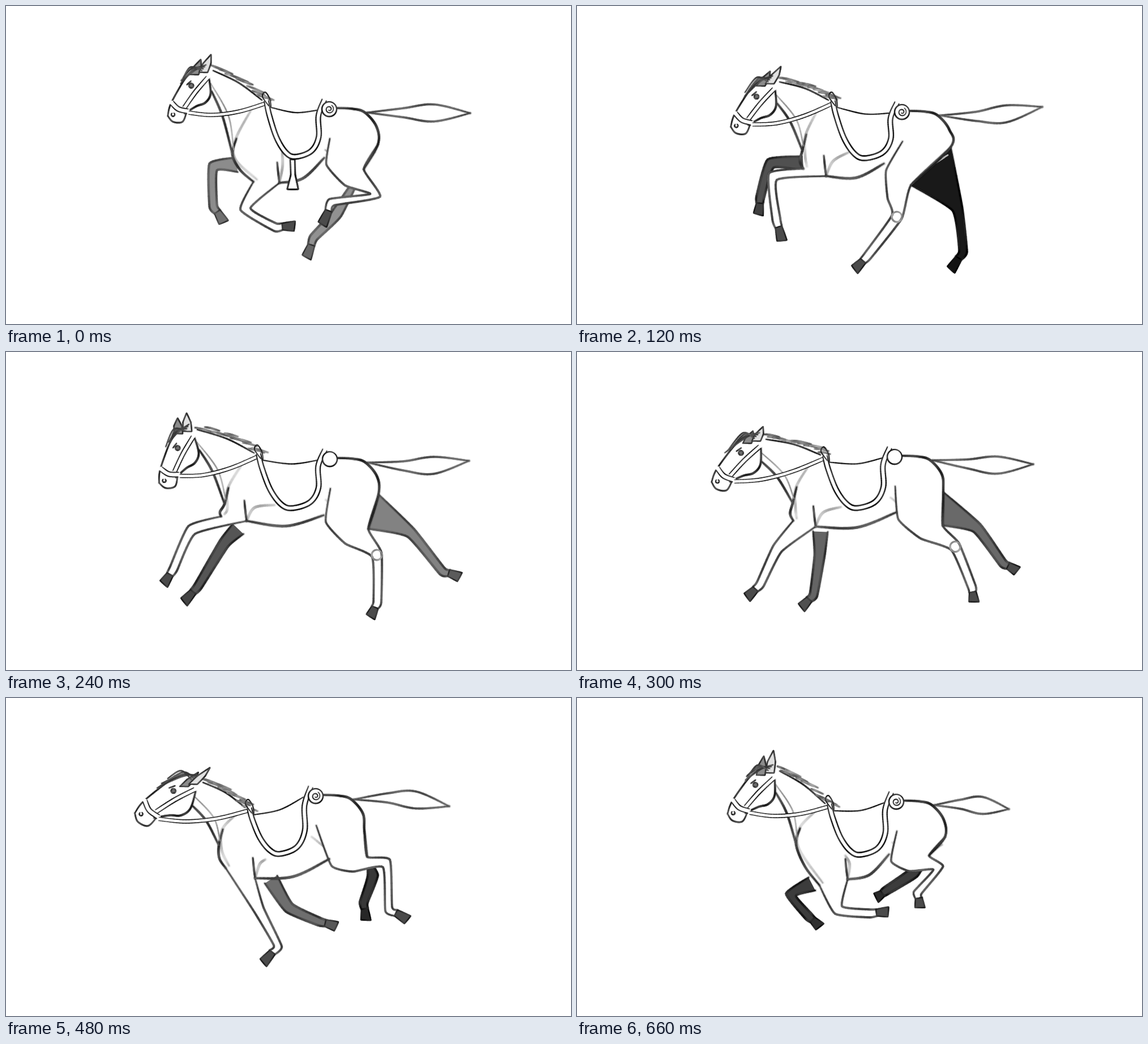
Animation, 998 px wide and 561 px high, one loop 720 ms. Source, as an HTML page with a canvas:

```html
<!DOCTYPE html>
<html lang="en">
<head>
<meta charset="utf-8">
<title>Galloping horse sketch</title>
<style>
html, body { margin: 0; width: 100%; height: 100%; overflow: hidden; background: #fff; }
canvas { display: block; width: 998px; height: 561px; }
</style>
</head>
<body>
<canvas id="stage" width="998" height="561"></canvas>
<script>
const ctx = document.getElementById('stage').getContext('2d');
const STEP = 60;

// Joints of each key pose; everything else is built around them.
// head: poll, muzzle, ear tip
// trunk: withers, cantle, chest, forearm, elbow, stifle, gaskin, tail tip
// legs: (top of far foreleg,) knee or hock, fetlock, toe
const KEYS = [
  {
    at: 0, marks: 'rein curl stirrup', hindTone: 145, foreTone: 140,
    head: [[358, 115], [298, 200], [362, 86]],
    trunk: [[460, 168], [562, 166], [400, 262], [437, 310], [483, 312], [566, 280], [632, 288], [820, 189]],
    nearHind: [[652, 334], [576, 346], [560, 384]], farHind: [[585, 365], [544, 408], [532, 442]],
    nearFore: [[423, 358], [475, 390], [508, 388]], farFore: [[408, 280], [366, 284], [366, 352], [384, 380]]
  }, {
    at: 2, marks: 'rein curl hock', hindTone: 25, foreTone: 80,
    head: [[350, 135], [284, 220], [360, 107]],
    trunk: [[452, 168], [565, 171], [398, 255], [400, 287], [440, 300], [546, 290], [590, 316], [822, 178]],
    nearHind: [[565, 372], [514, 440], [492, 464]], farHind: [[672, 358], [682, 432], [662, 464]],
    nearFore: [[346, 301], [352, 375], [362, 412]], farFore: [[400, 278], [342, 278], [324, 336], [321, 366]]
  }, {
    at: 4, marks: 'rein hock', hindTone: 130, foreTone: 85,
    head: [[330, 138], [284, 235], [319, 108]],
    trunk: [[446, 180], [563, 173], [386, 268], [380, 290], [425, 298], [565, 300], [640, 312], [818, 192]],
    nearHind: [[655, 358], [656, 440], [645, 466]], farHind: [[715, 319], [770, 386], [800, 396]],
    nearFore: [[328, 314], [296, 382], [280, 408]], farFore: [[410, 312], [385, 338], [340, 412], [316, 440]]
  }, {
    at: 6, marks: 'rein hock', hindTone: 80, foreTone: 115,
    head: [[322, 172], [216, 240], [338, 156]],
    trunk: [[430, 187], [541, 165], [376, 265], [384, 305], [418, 318], [570, 290], [652, 300], [794, 204]],
    nearHind: [[681, 329], [738, 386], [758, 412]], farHind: [[698, 302], [734, 358], [752, 374]],
    nearFore: [[380, 380], [352, 436], [324, 456]], farFore: [[450, 322], [472, 380], [496, 443], [480, 460]]
  }, {
    at: 8, marks: 'rein curl', hindTone: 55, foreTone: 110,
    head: [[340, 150], [238, 215], [360, 123]],
    trunk: [[430, 195], [538, 157], [376, 260], [388, 300], [440, 318], [575, 296], [638, 280], [783, 191]],
    nearHind: [[672, 292], [676, 372], [708, 390]], farHind: [[648, 312], [632, 360], [636, 390]],
    nearFore: [[447, 374], [480, 437], [456, 466]], farFore: [[468, 320], [500, 370], [552, 394], [582, 402]]
  }, {
    at: 9, marks: 'hock', hindTone: 35, foreTone: 35,
    head: [[342, 145], [252, 220], [357, 108]],
    trunk: [[436, 200], [550, 160], [375, 272], [404, 330], [470, 330], [560, 290], [630, 281], [760, 211]],
    nearHind: [[656, 298], [652, 368], [678, 390]], farHind: [[602, 316], [598, 370], [600, 396]],
    nearFore: [[505, 390], [542, 446], [520, 466]], farFore: [[436, 345], [455, 385], [530, 385], [564, 381]]
  }, {
    at: 11, marks: 'rein curl', hindTone: 60, foreTone: 60,
    head: [[350, 130], [278, 212], [347, 93]],
    trunk: [[446, 188], [555, 167], [387, 258], [428, 330], [478, 320], [555, 288], [622, 278], [763, 196]],
    nearHind: [[638, 300], [602, 343], [606, 368]], farHind: [[595, 308], [546, 340], [530, 352]],
    nearFore: [[462, 374], [516, 380], [548, 377]], farFore: [[415, 328], [378, 347], [408, 384], [428, 402]]
  }
];

const mix = (a, b, t) => a + (b - a) * t;
const add = (p, x, y) => [p[0] + x, p[1] + y];
const go = (p, v, d) => [p[0] + v[0] * d, p[1] + v[1] * d];
const between = (a, b, t, x = 0, y = 0) => [mix(a[0], b[0], t) + x, mix(a[1], b[1], t) + y];
const aim = (a, b) => {
  const x = b[0] - a[0], y = b[1] - a[1], l = Math.hypot(x, y) || 1;
  return [x / l, y / l];
};
const turn = v => [-v[1], v[0]];
const grey = v => { v = Math.round(Math.max(0, Math.min(255, v))); return `rgb(${v},${v},${v})`; };

let seed = 1;
const rnd = () => (seed = seed * 16807 % 2147483647) / 2147483647;

// Blend any nested set of numbers; marks stay only where both poses have them
function blend(a, b, t) {
  if (typeof a === 'number') return mix(a, b, t);
  if (typeof a === 'string') return a.split(' ').filter(m => b.includes(m)).join(' ');
  if (Array.isArray(a)) return a.map((v, i) => blend(v, b[i], t));
  return Object.fromEntries(Object.keys(a).map(k => [k, blend(a[k], b[k], t)]));
}

// Spline through the points; a small bend keeps the corners
function curve(pts, bend = 1) {
  const out = [pts[0]], last = pts.length - 1;
  for (let i = 0; i < last; i++) {
    const p = pts[i], q = pts[i + 1], o = pts[Math.max(0, i - 1)], r = pts[Math.min(last, i + 2)];
    for (let j = 1; j <= 10; j++) {
      const t = j / 10, a = bend / 2 * t * (1 - t) ** 2, b = bend / 2 * t * t * (t - 1);
      const m = between(p, q, t * t * (3 - 2 * t));
      out.push([0, 1].map(k => m[k] + a * (q[k] - o[k]) + b * (r[k] - p[k])));
    }
  }
  return out;
}

function spiral(c, r, turns, end) {
  return Array.from({ length: 40 }, (_, i) => {
    const t = i / 39, a = t * turns * Math.PI * 2 - 1, s = mix(r, r * end, t);
    return add(c, s * Math.cos(a), s * Math.sin(a));
  });
}

function outline(path) {
  ctx.beginPath();
  path.forEach(p => ctx.lineTo(...p));
}

function fill(path, tone) {
  outline(path);
  ctx.fillStyle = grey(tone);
  ctx.fill();
}

// Charcoal line: a soft halo, then a tapered core of uneven tone
function brush(path, tone, width) {
  outline(path);
  ctx.strokeStyle = `rgba(0,0,0,${.22 * (1 - tone / 255)})`;
  ctx.lineWidth = width * 1.5;
  ctx.stroke();
  const n = path.length, phase = rnd() * 6;
  for (let i = 1; i < n; i++) {
    ctx.strokeStyle = grey(tone + 18 * Math.sin(i * .45 + phase));
    ctx.lineWidth = width * (.5 + .5 * Math.sqrt(Math.sin(Math.PI * i / n)));
    outline([path[i - 1], path[i]]);
    ctx.stroke();
  }
}

const line = (pts, tone, width, bend) => brush(curve(pts, bend), tone, width);

function shape(pts, tone, edge, width, bend = .2) {
  const path = curve([...pts, pts[0]], bend);
  fill(path, tone);
  brush(path, edge, width);
}

function band(pts, gap, tone, width) {
  const path = curve(pts), last = path.length - 1;
  outline(path);
  ctx.strokeStyle = '#fff';
  ctx.lineWidth = gap;
  ctx.stroke();
  for (const side of [-1, 1]) {
    brush(path.map((p, i) => go(p, turn(aim(path[Math.max(0, i - 1)], path[Math.min(last, i + 1)])), side * gap / 2)), tone, width);
  }
}

// Two sides run from the body past knee and fetlock to a filled hoof
function leg(front, back, [knee, fetlock, toe], tone, edge, hoofTone) {
  const topF = front[front.length - 1], topB = back[back.length - 1];
  const top = between(topF, topB, .5), down = aim(fetlock, toe), hoof = between(fetlock, toe, .4);
  const across = (a, b, c) => turn(aim([0, 0], go(aim(a, b), aim(b, c), 1)));
  const nk = across(top, knee, fetlock), nf = across(knee, fetlock, toe), nh = turn(down);
  const facing = (topF[0] - topB[0]) * nk[0] + (topF[1] - topB[1]) * nk[1] > 0 ? 1 : -1;
  const side = (start, s) => curve([...start, go(knee, nk, 9 * s), go(fetlock, nf, 7 * s), go(hoof, nh, 6 * s)], .5);
  const a = side(front, facing), b = side(back, -facing);
  fill([...a, ...b.slice().reverse()], tone);
  brush(a, edge, 3.6);
  brush(b, edge, 3.6);
  shape([go(hoof, nh, 6), go(toe, nh, 9), go(go(toe, down, 3), nh, -8), go(hoof, nh, -6)], hoofTone, hoofTone * .6, 2.2);
}

function drawHead([poll, muzzle, ear], withers, chest, marks) {
  const u = aim(poll, muzzle), v = turn(u), size = Math.hypot(muzzle[0] - poll[0], muzzle[1] - poll[1]);
  const at = (x, y) => go(go(poll, u, x * size), v, y * size);

  // neck and mane
  line([at(.25, -.24), between(at(.25, -.24), chest, .45, 3, -5), chest], 65, 4);
  line([at(.15, -.15), between(at(.15, -.15), chest, .5, 12, -6), add(chest, 2, -8)], 165, 2.5);
  const crest = curve([add(poll, 8, -1), between(poll, withers, .5, 2, -6), add(withers, -8, -2)]);
  brush(crest, 50, 2.8);
  crest.forEach((p, i) => {
    if (i % 2) return;
    const root = add(p, -4, -3 - rnd() * 7), slope = aim(poll, withers), l = 16 + rnd() * 14;
    line([root, go(add(root, 0, -2), slope, l * .5), go(add(root, 5, -1), slope, l)], 105 + rnd() * 50, 3.5);
  });

  // ears: the far one is smaller and behind
  for (const [x, y, k] of [[-16, 4, .85], [0, 0, 1]]) {
    const base = add(poll, x - 10, y + 2), tip = between(base, add(ear, x, y), k);
    shape([add(base, -7, 0), between(base, tip, .5, -7), tip, between(base, tip, .5, 7), add(base, 8, 0)], k < 1 ? 140 : 225, 60, 2.4);
  }

  // face
  line([at(.08, .2), at(.3, .25), at(.55, .24), at(.85, .2), at(1.02, .13)], 50, 2.8);
  line([at(1.02, .13), at(1.05, 0), at(.96, -.13), at(.8, -.1)], 65, 2.8);
  line([at(.82, -.08), at(.61, -.17), at(.47, -.26), at(.3, -.25), at(.1, -.08)], 45, 3.6);
  for (let i = 0; i < 4; i++) line([at(-.06 + i * .04, .1), at(.12, .2 + i * .03), at(.3 + rnd() * .25, .25 + rnd() * .05)], 75, 2.6);
  const eye = spiral(at(.37, .1), 4, 1, 1);
  fill(eye, 110);
  brush(eye, 70, 2.4);
  brush(spiral(at(.95, .07), 3, .8, 1), 55, 2.2);
  line([at(.31, .15), at(.4, .17)], 60, 2.4);

  // bridle
  band([at(.1, -.05), at(.42, -.02), at(.74, -.02)], 7, 45, 1.8);
  band([at(.8, .2), at(.82, .05), at(.76, -.1)], 8, 50, 1.8);
  if (marks.includes('rein')) {
    const bit = at(.77, -.13);
    band([bit, between(bit, withers, .3, 0, 10), between(bit, withers, .65, 0, 11), add(withers, 4, 2)], 6, 40, 1.5);
  }
}

function drawSaddle(withers, cantle, marks) {
  const low = between(withers, cantle, .5, 0, 99), roll = add(cantle, 9, 16);
  const bow = (a, x, y) => [mix(a[0], low[0], x), mix(a[1], low[1], y)];
  line([add(withers, 8, 11), between(withers, cantle, .5, 0, 21), add(cantle, -13, 18)], 35, 2.2);
  if (marks.includes('stirrup')) {
    const s = add(low, -9, 5);
    shape([s, add(s, 1, 27), add(s, -5, 52), add(s, 14, 52), add(s, 9, 27), add(s, 8, 0)], 255, 40, 2.8);
  }
  band([withers, bow(withers, .1, .25), bow(withers, .35, .65), bow(withers, .67, .92), low,
    bow(cantle, .45, .9), bow(cantle, .19, .65), bow(cantle, .2, .28), cantle], 8, 35, 2.3);
  line([add(withers, 4, 8), add(withers, -7, -8), add(withers, -2, -16), add(withers, 6, -4), add(withers, 8, 10)], 45, 2);
  fill(spiral(roll, 13, 1, 1), 255);
  brush(spiral(roll, 13, 1, 1), 40, 2.3);
  if (marks.includes('curl')) brush(spiral(roll, 8, 1.5, .25), 60, 1.8);
}

function draw(pose, phase) {
  seed = 7 + Math.round(phase * 100);
  ctx.lineCap = ctx.lineJoin = 'round';
  ctx.fillStyle = '#fff';
  ctx.fillRect(0, 0, 998, 561);

  const { head, marks, hindTone, foreTone, nearHind, farHind, nearFore } = pose;
  const [withers, cantle, chest, arm, elbow, stifle, gaskin, tail] = pose.trunk;
  const [farTop, ...farFore] = pose.farFore;
  const dock = add(cantle, 72, 22), rump = add(cantle, 95, 78), flank = add(cantle, 10, 68);
  const wide = turn(aim(farTop, farFore[0]));

  leg([gaskin], [rump], farHind, hindTone, hindTone * .6, hindTone * .7);
  leg([go(farTop, wide, 13)], [go(farTop, wide, -13)], farFore, foreTone, foreTone * .6, foreTone * .8);
  fill([withers, cantle, dock, rump, gaskin, stifle, elbow, arm, chest], 255);

  // construction lines
  line([add(withers, -25, 12), add(chest, 6, -28), add(chest, 5, 8), add(arm, 6, -4)], 200, 4.5);
  line([add(flank, -8, 20), between(flank, rump, .4, 0, 42), add(rump, -5, 14)], 200, 4);
  line([add(withers, 28, 90), between(withers, elbow, .8, 10, 0), elbow], 185, 4.5);

  const root = add(dock, 4, 0), sway = 8 * Math.sin(phase * Math.PI * 2);
  for (const s of [-1, 1]) {
    line([root, between(root, tail, .35, 0, sway + s * 8), between(root, tail, .65, 0, sway + s * 15), tail], 90, 3.6);
  }

  const thigh = between(stifle, nearHind[0], .45, -6, 12);
  leg([flank, stifle, thigh], [rump, gaskin], nearHind, 255, 80, 75);
  leg([arm], [elbow], nearFore, 255, 80, 75);
  if (marks.includes('hock')) brush(spiral(nearHind[0], 9, 1, 1), 150, 3);

  // body
  line([add(elbow, -4, -36), add(elbow, -2, -16), elbow], 75, 3.6);
  line([elbow, between(elbow, stifle, .5, 0, 8), add(stifle, -4, -12)], 80, 4.5);
  line([add(chest, 7, -28), chest, between(chest, arm, .5, -5, 3), arm], 65, 4.2);
  line([add(cantle, 21, 14), between(cantle, dock, .7, 0, 0), dock, between(dock, rump, .5, 9, -3), rump, gaskin], 50, 4.2);

  drawHead(head, withers, chest, marks);
  drawSaddle(withers, cantle, marks);
}

function poseAt(step) {
  const i = KEYS.findLastIndex(k => k.at <= step), a = KEYS[i];
  if (a.at === step) return a;
  const b = KEYS[i + 1];
  return blend(a, b, (step - a.at) / (b.at - a.at));
}

const start = performance.now();
let shown = -1;
function tick() {
  const step = Math.floor(Math.max(0, performance.now() - start) / STEP) % 12;
  if (step !== shown) draw(poseAt(step), step / 12);
  shown = step;
  requestAnimationFrame(tick);
}
tick();
</script>
</body>
</html>
```
